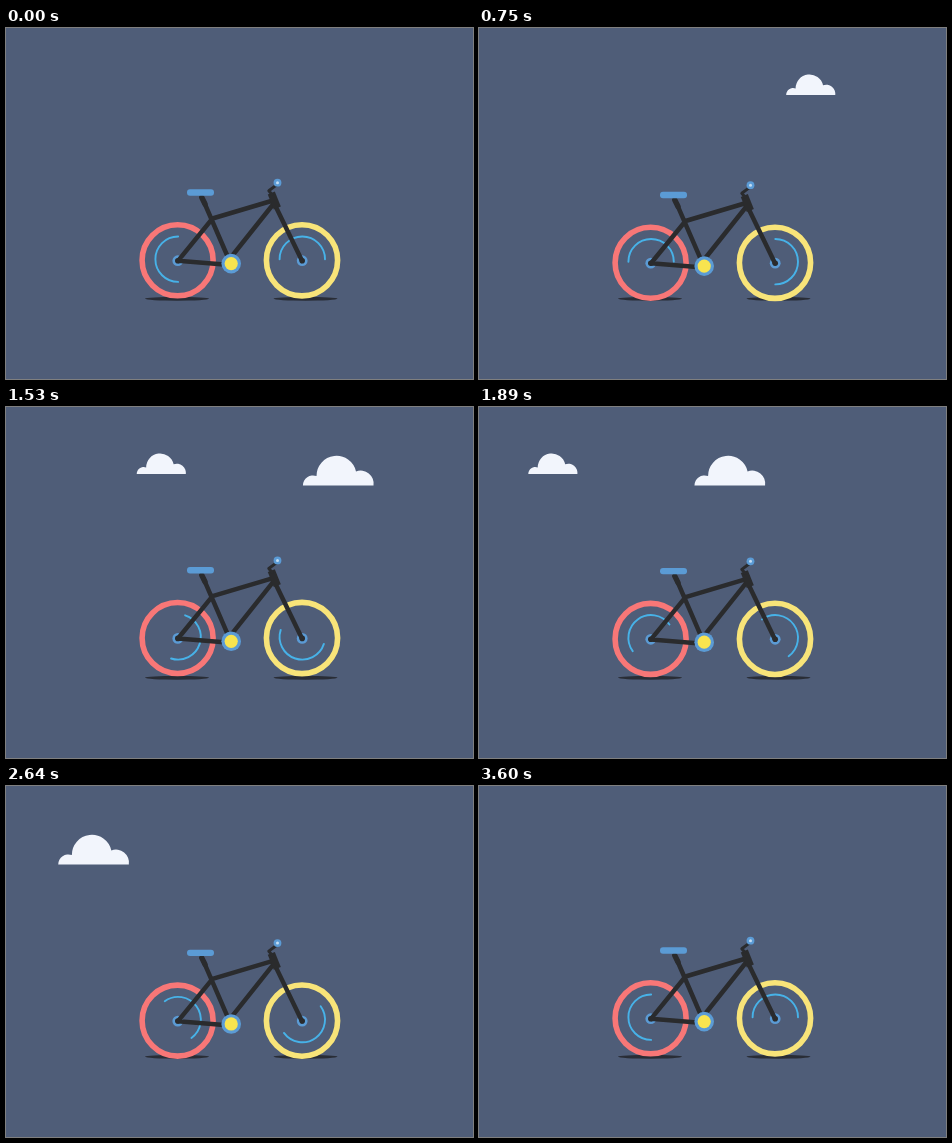
An HTML page for the animation above (3670 ms loop, 467x351 px).

```html
<!DOCTYPE html>
<html lang="en">
<head>
<meta charset="utf-8">
<title>Bicycle ride</title>
<style>
  html, body { margin: 0; width: 100%; height: 100%; overflow: hidden; background: #4f5d78; }
  svg { display: block; width: 467px; height: 351px; }
  .line { fill: none; stroke: #2a2b2d; stroke-width: 4.5; stroke-linecap: round; stroke-linejoin: round; }
  .tire { fill: none; stroke-width: 5.6; }
  .spin { fill: none; stroke: #47b2e8; stroke-width: 1.9; stroke-linecap: round; }
  .blue { fill: #5b9bd5; }
  .dark { fill: #2a2b2d; }
  .cloud { fill: #f2f5fc; }
  .shadow { fill: #292d36; }
</style>
</head>
<body>
<svg viewBox="0 0 467 351">
  <defs>
    <path id="puff" d="M0 0A10 10 0 0 1 13.6 -9.3A20 20 0 0 1 53.1 -14A13 13 0 0 1 70.6 0Z"/>
  </defs>
  <rect width="467" height="351" fill="#4f5d78"/>
  <use id="small" class="cloud" href="#puff"/>
  <use id="big" class="cloud" href="#puff"/>
  <ellipse class="shadow" cx="171" cy="270.8" rx="32" ry="1.9"/>
  <ellipse class="shadow" cx="299.5" cy="270.8" rx="32" ry="1.9"/>
  <g id="bike">
    <circle class="tire" cx="171.6" cy="232.3" r="35.5" stroke="#f87777"/>
    <circle class="tire" cx="296" cy="232.3" r="35.6" stroke="#f8e479"/>
    <g transform="translate(172.1 231.2)">
      <path id="rear" class="spin" d="M0 -22.7A22.7 22.7 0 0 0 0 22.7"/>
    </g>
    <g transform="translate(296.3 231.2)">
      <path id="front" class="spin" d="M-22.7 0A22.7 22.7 0 0 1 22.7 0"/>
    </g>
    <circle class="blue" cx="171.8" cy="232.7" r="5.4"/>
    <circle class="blue" cx="296.2" cy="232.7" r="5.4"/>
    <circle class="dark" cx="171.8" cy="232.7" r="2.8"/>
    <circle class="dark" cx="296.2" cy="232.7" r="2.8"/>
    <path class="line" d="M172 232.8L206.5 190.5L267 172.5M269.4 173.5L224.8 229.5M172 232.8L221 236.8M198 174L224 234"/>
    <path class="line" d="M269 177L296 232.8"/>
    <path class="line" style="stroke-width:5.4" d="M195.8 169.5L199 176"/>
    <path class="line" style="stroke-width:7.6;stroke-linecap:butt" d="M265.3 165L271.3 180"/>
    <path class="line" style="stroke-width:3" d="M266 166.5L262.8 162.8L270 157.4"/>
    <rect class="blue" x="181" y="161.3" width="27" height="6.4" rx="3"/>
    <circle class="blue" cx="271.5" cy="154.7" r="3.9"/>
    <circle cx="271.5" cy="154.7" r="1.5" fill="#c3dcf2"/>
    <circle class="blue" cx="225.2" cy="235.6" r="9.8"/>
    <circle cx="225.2" cy="235.6" r="6.6" fill="#f8e44f"/>
  </g>
</svg>
<script>
  const LOOP = 3670, STEP = 30, END = 3600;
  const SPEED = 0.2262, BRAKE_AT = 2310, BRAKE = 1.177e-4;
  const bumps = [
    [0, 0], [240, 2], [420, 1.1], [780, 2.5], [1050, 1.1], [1200, 2],
    [1530, -1.3], [1900, -0.4], [2280, -0.2], [2550, 2.4], [3030, 2],
    [3330, 1.8], [END, 0]
  ];
  const el = id => document.getElementById(id);
  const [small, big, bike, rear, front] = ['small', 'big', 'bike', 'rear', 'front'].map(el);
  const set = (node, value) => node.setAttribute('transform', value);

  function bounce(t) {
    const i = Math.max(1, bumps.findIndex(b => b[0] >= t));
    const [t0, y0] = bumps[i - 1], [t1, y1] = bumps[i];
    const k = (1 - Math.cos(Math.PI * (t - t0) / (t1 - t0))) / 2;
    return y0 + (y1 - y0) * k;
  }

  function draw(t) {
    const slow = Math.max(0, t - BRAKE_AT);
    const bigX = 643 - SPEED * t + BRAKE * slow * slow / 2;
    set(small, `translate(${476.8 - SPEED * t} 67) scale(.695)`);
    set(big, `translate(${bigX} 78.4)`);
    set(bike, `translate(0 ${bounce(t)})`);
    const spin = `rotate(${t * 0.6 % 360})`;
    set(rear, spin);
    set(front, spin);
  }

  function tick() {
    const t = performance.now() % LOOP;
    draw(Math.min(END, Math.floor(t / STEP) * STEP));
    requestAnimationFrame(tick);
  }
  tick();
</script>
</body>
</html>
```
